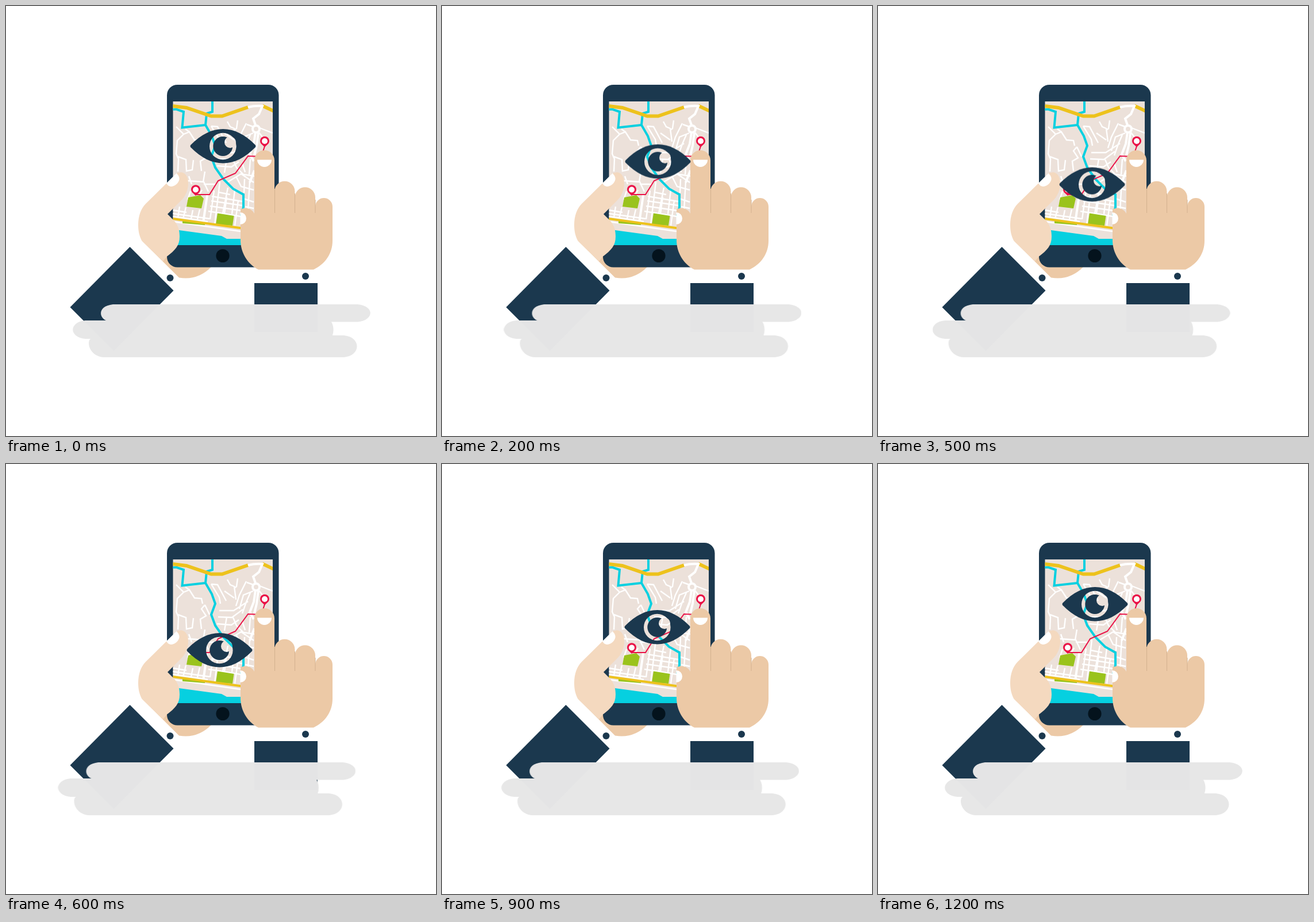
An HTML page for the animation above (1300 ms loop, 748 by 748 pixels).

```html
<!DOCTYPE html>
<html lang="en">
<head>
<meta charset="utf-8">
<title>Phone map</title>
<style>
  html, body { margin: 0; width: 100%; height: 100%; overflow: hidden; background: #fff; }
  svg { display: block; width: 100vw; height: 100vh; }
  .navy { fill: #1b384e; }
  .skin { fill: #ecc9a6; }
  .light { fill: #f4d9bf; }
  .road { fill: none; stroke: #fff; stroke-width: 2.4; }
  .wide { fill: none; stroke: #fff; stroke-width: 4; }
  .water { fill: none; stroke: #06d0e0; stroke-width: 4; }
  .main { fill: none; stroke: #edc21c; stroke-width: 6; }
  .park { fill: #9ac31c; }
  .route { fill: none; stroke: #ea1247; stroke-width: 2; }
  .gap { fill: none; stroke: #d3b18f; stroke-width: 1; }
  .eye { animation: look 1300ms infinite; }
  .cloud { fill: #e7e7e7; opacity: .99; animation: drift 1300ms infinite; }
  /* six steps out, six steps back, one step of rest */
  @keyframes look {
    0% { transform: translate(0, 0); animation-timing-function: steps(6, end); }
    46.1538% { transform: translate(-6px, 80px); animation-timing-function: steps(6, end); }
    92.3077%, 100% { transform: translate(0, 0); }
  }
  @keyframes drift {
    0% { transform: translateX(0); animation-timing-function: steps(6, end); }
    46.1538% { transform: translateX(-25.6px); animation-timing-function: steps(6, end); }
    92.3077%, 100% { transform: translateX(0); }
  }
</style>
</head>
<body>
<svg viewBox="0 0 748 748">
  <defs>
    <clipPath id="screen"><rect x="290.5" y="166" width="173.5" height="250"/></clipPath>
    <mask id="iris" maskUnits="userSpaceOnUse" x="310" y="205" width="135" height="80">
      <rect x="310" y="205" width="135" height="80" fill="#fff"/>
      <circle cx="377.3" cy="244" r="23.3"/>
      <circle cx="377.3" cy="244" r="17" fill="#fff"/>
      <circle cx="390" cy="237" r="10"/>
    </mask>
    <g id="pin">
      <path d="M0 10.5L-6.4 4.5A8 8 0 1 1 6.4 4.5Z" fill="#ea1247"/>
      <circle r="5" fill="#fff"/>
    </g>
  </defs>

  <!-- sleeves and back of the left hand -->
  <path class="navy" d="M215.500 419L291.500 495L187.500 600L111.500 524Z"/>
  <rect class="navy" x="432" y="482" width="110" height="85"/>
  <path class="skin" d="M236 408L301 472.500Q334 478 358 453L340 430H270Z"/>

  <!-- phone -->
  <rect class="navy" x="280" y="137" width="194.500" height="317.500" rx="18"/>
  <circle cx="377" cy="434.500" r="11.600" fill="#04131d"/>

  <g clip-path="url(#screen)">
    <rect x="290" y="166" width="175" height="251" fill="#ece1da"/>

    <g class="road">
      <path d="M296 210L309 223L298 234L296 257L300 266L299 288M309 223L319 219L328 233L340 234L342 243M319 219L312 214"/>
      <path d="M299 262L313 267L314 287L324 285L326 268M340 287L338 270L348 264L340 252L346 245M346 245L354 262"/>
      <path d="M357 209L368 210L383 238M357 209L371 232L373 243M385 201L390 210L397 213L400 236M403 199L401 213L397 216M380 221L397 233"/>
      <path d="M418 204L406 228L400 247M430 221L413 228L406 252M425 224L418 240L411 260M371 255H396L421 239M369 266L393 267L412 253"/>
      <path d="M367 278L392 280L405 271M384 266L380 290M395 267L401 281L413 293L432 296M411 274L416 289M425 266L423 293"/>
      <path d="M441 212L464 221M430 210L419 206M440 220L447 229M386 306L409 292L431 307M401 298L409 314L431 320"/>
      <path d="M415 301L414 325M424 304L421 357M398 320L393 362M386 316L377 361M372 306L363 381M362 321L355 371"/>
      <path d="M358 331L411 340M357 339L411 347M355 348L410 356M352 357L408 366M370 324L390 328M384 332L380 361M404 338L398 382"/>
      <path d="M290 355L314 359M290 361L354 370M290 366L351 375M302 349L299 368M313 350L308 370M325 355L322 370M337 354L333 371"/>
      <path d="M318 296L323 310M316 304L344 306L352 323M343 306L346 288M290 375L408 392M344 310L366 310"/>
      <path d="M413 335L431 341M416 349L431 352M321 322L316 337M341 320L336 329"/>
    </g>
    <path class="wide" d="M434 220L431 240L424 258L431 270M439 221L436 243L432 260M350 329L343 377M432 286L424 307"/>

    <path class="park" d="M317 333L338 329L344 335L340 352L314 349Z"/>
    <path class="park" d="M368 360.500L396.500 365L394 382L365 380Z"/>
    <path class="park" d="M307 373L346 379V381L307 378Z"/>

    <path class="water" d="M290 180L296 179.500L309 184L306.500 211.500L347 207L349 187L359 184V166"/>
    <path class="water" d="M347 207L358 226L364 243L357 262L364 281L378 301L395 318L413 328L413 350L409 365"/>
    <path class="main" d="M290 174L314 177L357 191.500H376L421 176M446 173.500L466 183"/>
    <path class="wide" d="M421 176Q433 173 446 174L440 188L430 196L434 207"/>
    <circle class="wide" cx="435" cy="214" r="6" stroke-width="3"/>
    <path class="main" style="stroke-width:4" d="M290 370L410 386.500"/>
    <path d="M290 388.500L375 400L384 405H420V417H290Z" fill="#06d0e0"/>

    <path class="route" d="M330 328H354L369 304L399 291L421 261L444 262L450 244"/>
    <use href="#pin" x="330" y="319.500"/>
    <use href="#pin" x="450" y="235"/>
  </g>

  <!-- left hand -->
  <path class="light" d="M279 308.500L292 296C303 283 317 290 317 308C317 321 312 331 305 338L281 362L291 372C299 380 302 389 302 401C302 417 294 425 279.500 436L273 444L236 408C232 400 230 392 230 381C230 365 235 352 243 344Z"/>
  <path d="M279 308.500L296.500 291Q302 296 301.500 301.500C300 309 293 314 287 314Q282 313.500 279 308.500Z" fill="#fff"/>
  <circle class="navy" cx="285.500" cy="473" r="6"/>

  <!-- right hand -->
  <path class="skin" d="M408 353.500C417 350 427 352 432 361V268.500A17.500 17.500 0 0 1 467 268.500V322.500A17.500 17.500 0 0 1 502.500 322.500V333A17.600 17.600 0 0 1 538 333V349A15 15 0 0 1 568 349V408C568 431 555 449 535 458.500H439C419 448 408 428 408 407Z"/>
  <path class="gap" d="M467.500 318V360M502.500 326V360M538 337V360"/>
  <path d="M437 267.500H462A12.500 12.500 0 0 1 437 267.500Z" fill="#fff"/>
  <path d="M407.500 359A10.500 10.500 0 0 1 407.500 380Z" fill="#fff"/>
  <circle class="navy" cx="521" cy="470" r="6"/>

  <g class="eye">
    <path class="navy" mask="url(#iris)" d="M321 242C340 223 358 214 377.500 214S415 223 434 242Q435 243.700 434 245.500C415 264.500 397 273.500 377.500 273.500S340 264.500 321 245.500Q320 243.700 321 242Z"/>
  </g>

  <g class="cloud">
    <path d="M186 519H612C641 522 641 546 612 549.500H566Q572 560 568 573H588C618 576 618 608 588 611H170C140 608 140 576 150 579H138C109 576 109 550 138 547H174C161 541 160 522 186 519Z"/>
  </g>
</svg>
</body>
</html>
```
